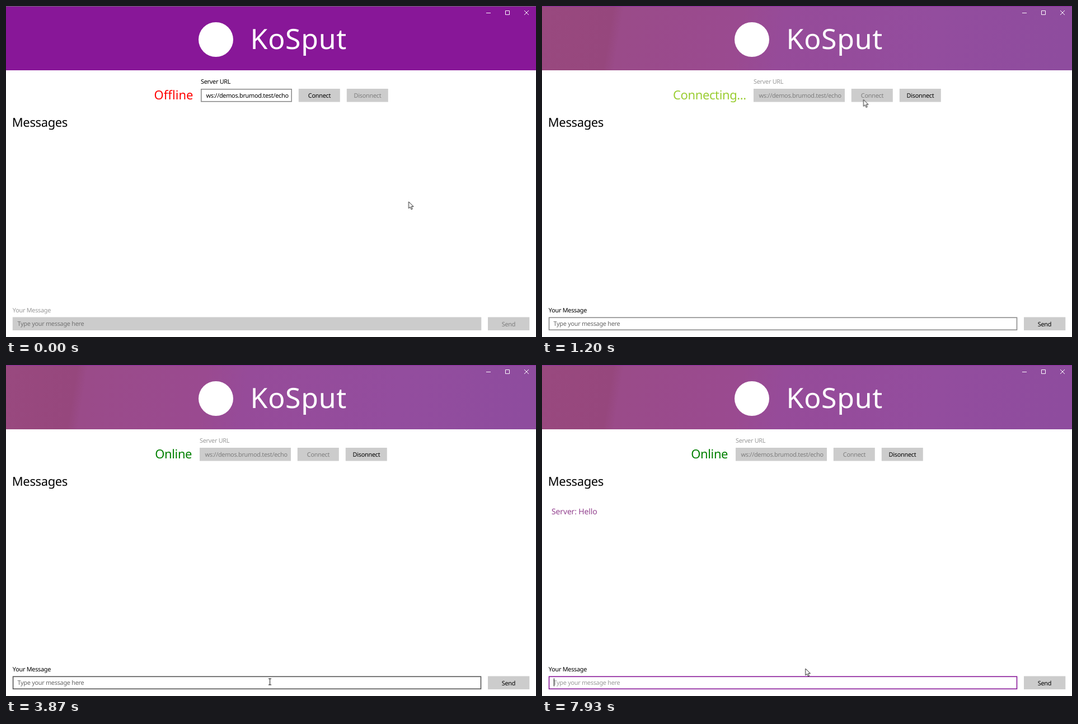
Recreate the animation shown at these times as an HTML page. Size 947 px wide and 592 px high, loop 8000 ms.

```html
<!DOCTYPE html>
<html lang="en">
<head>
<meta charset="utf-8">
<title>Chat client</title>
<style>
html, body { margin: 0; width: 100%; height: 100%; overflow: hidden; background: #fff; }
svg { display: block; width: 947px; height: 592px; }
svg * { animation: 8s step-end infinite; animation-name: none; }

text { font: 10.9px "Noto Sans", "Open Sans", sans-serif; letter-spacing: -.28px; text-rendering: geometricPrecision; }
.mid { text-anchor: middle; }
.head { font-size: 22px; letter-spacing: -.38px; }
.title { font-size: 50px; letter-spacing: .7px; fill: #fff; }
.line { fill: none; stroke: #fff; }
.button { fill: #ccc; }
.field { stroke-width: 1.6px; }
.label { --off: #999; }

/* controls that switch on or off when the connection starts */
.enable { animation-name: enable; }
.disable { animation-name: disable; }
@keyframes enable { 0% { fill: var(--off, #7d7d7d); } 15% { fill: #000; } }
@keyframes disable { 0% { fill: #000; } 15% { fill: var(--off, #7d7d7d); } }

#acrylic { animation-name: acrylic; animation-timing-function: linear; }
@keyframes acrylic { 0%, 12.5% { opacity: 0; } 15%, 100% { opacity: 1; } }

#group { animation-name: shift; }
@keyframes shift {
  0% { transform: translateX(348px); }
  15% { transform: translateX(378px); }
  48.375% { transform: translateX(346px); }
}

#offline { fill: #f00; letter-spacing: .05px; animation-name: offline; }
#connecting { fill: #9acd32; animation-name: connecting; }
#online { fill: #008000; animation-name: online; }
@keyframes offline { 0% { opacity: 1; } 15% { opacity: 0; } }
@keyframes connecting { 0% { opacity: 0; } 15% { opacity: 1; } 48.375% { opacity: 0; } }
@keyframes online { 0% { opacity: 0; } 48.375% { opacity: 1; } }

#url { animation-name: url; }
@keyframes url { 0% { fill: #fff; stroke: #8e8e8e; } 15% { fill: #ccc; stroke: #ccc; } }

#connect { transform-box: fill-box; transform-origin: center; animation-name: press; }
@keyframes press {
  0% { fill: #ccc; stroke: none; }
  6.75% { fill: #ccc; stroke: #8a8a8a; }
  12.5% { fill: #999; stroke: none; transform: scale(.98); }
  15% { fill: #ccc; stroke: none; transform: none; }
}

#entry { animation-name: entry; }
@keyframes entry {
  0% { fill: #ccc; stroke: #ccc; }
  15% { fill: #fff; stroke: #8a8a8a; }
  25.625% { fill: #fff; stroke: #555; }
  54.125% { fill: #fff; stroke: #881798; }
}
#hint { animation-name: hint; }
@keyframes hint {
  0% { fill: #737373; }
  15% { fill: #666; }
  54.125% { fill: #999; }
  69.125% { fill: transparent; }
  95.875% { fill: #999; }
}
#clear { stroke: #555; animation-name: clear; }
@keyframes clear { 0% { opacity: 0; } 69.125% { opacity: 1; } 95.875% { opacity: 0; } }
#caret { animation-name: caret; }
@keyframes caret { 0% { opacity: 0; } 54.125% { opacity: 1; } }

#reply { font-size: 14px; letter-spacing: -.15px; fill: #93428f; animation-name: reply; }
@keyframes reply { 0% { opacity: 0; } 99.125% { opacity: 1; } }

#pointer { animation-name: travel; }
@keyframes travel {
  0% { transform: translate(719.5px, 350px); }
  .5% { transform: translate(719.5px, 350px); animation-timing-function: ease-in-out; }
  7.5% { transform: translate(574.5px, 167.5px); }
  15.4% { transform: translate(574.5px, 167.5px); animation-timing-function: cubic-bezier(.4, 0, .7, .8); }
  22.5% { transform: translate(500px, 530px); animation-timing-function: ease-out; }
  29.125% { transform: translate(475px, 562px); }
  31.625% { transform: translate(471.5px, 566.5px); }
  57.5% { transform: translate(470.8px, 543px); }
}
#arrow { fill: #fff; stroke: #222; animation-name: arrow; }
#beam { stroke: #000; animation-name: beam; }
@keyframes arrow { 0% { opacity: 1; } 25.625% { opacity: 0; } 57.5% { opacity: 1; } }
@keyframes beam { 0% { opacity: 0; } 25.625% { opacity: 1; } 57.5% { opacity: 0; } }
</style>
</head>
<body>
<svg viewBox="0 0 947 592">
  <defs>
    <linearGradient id="tint" x2="1" y2=".02">
      <stop offset="0" stop-color="#99497f"/>
      <stop offset=".135" stop-color="#96477d"/>
      <stop offset=".155" stop-color="#9a4b89"/>
      <stop offset=".38" stop-color="#9a4a90"/>
      <stop offset=".46" stop-color="#964b99"/>
      <stop offset=".75" stop-color="#934d9e"/>
      <stop offset="1" stop-color="#8e4c9e"/>
    </linearGradient>
  </defs>

  <rect width="947" height="115" fill="#881798"/>
  <rect width="947" height="1" fill="#776a7a"/>
  <g id="acrylic">
    <rect width="947" height="115" fill="url(#tint)"/>
    <rect width="947" height="1" fill="#8f2ba6"/>
  </g>
  <circle cx="375" cy="60" r="31" fill="#fff"/>
  <text class="title" x="436.5" y="77">KoSput</text>
  <path class="line" d="M858 12.5h8M892.5 8.5h7v7h-7zM926 8l8 8M934 8l-8 8"/>

  <text class="head" id="offline" x="264.5" y="167">Offline</text>
  <text class="head" id="connecting" x="234" y="167">Connecting...</text>
  <text class="head" id="online" x="266.3" y="167">Online</text>

  <g id="group">
    <text class="label disable" x="0" y="139">Server URL</text>
    <rect class="field" id="url" x=".8" y="148.8" width="161.4" height="22"/>
    <text class="disable" x="9.5" y="164">ws://demos.brumod.test/echo</text>
    <rect class="button" id="connect" x="174.8" y="148" width="74" height="23.6"/>
    <text class="mid disable" x="212" y="164.4">Connect</text>
    <rect class="button" x="260.8" y="148" width="74" height="23.6"/>
    <text class="mid enable" x="298" y="164.4">Disonnect</text>
  </g>

  <text class="head" x="10.8" y="216">Messages</text>
  <text id="reply" x="17" y="267">Server: Hello</text>

  <text class="label enable" x="11.8" y="548">Your Message</text>
  <rect class="field" id="entry" x="12.6" y="557.3" width="835.9" height="22"/>
  <text id="hint" x="20.5" y="572">Type your message here</text>
  <text id="typed" x="20.5" y="572"></text>
  <rect id="caret" x="21" y="560.5" width="1" height="14"/>
  <path id="clear" d="M834.8 565l6.8 6.8M841.6 565l-6.8 6.8"/>
  <rect class="button" x="861" y="556.5" width="74.3" height="23.6"/>
  <text class="mid enable" x="898" y="572.6">Send</text>

  <g id="pointer">
    <path id="arrow" d="M0 0V12L2.8 9.4 4.7 13.8 6.7 13 4.8 8.7H8.6Z"/>
    <path id="beam" fill="none" d="M-2.5-5.5h5M0-5.5v11M-2.5 5.5h5"/>
  </g>
</svg>
<script>
const $ = id => document.getElementById(id);
const typed = $('typed'), caret = $('caret');
const keys = [[0, ''], [5530, 'H'], [6270, 'He'], [6530, 'Hel'], [6800, 'Hell'], [7000, 'Hello'], [7670, '']];
const clock = $('pointer').getAnimations()[0];

// Typing follows the same clock as the CSS animations.
function tick() {
  const t = (clock.currentTime || 0) % 8000;
  const text = keys.filter(([at]) => at <= t).pop()[1];
  if (typed.textContent !== text) {
    typed.textContent = text;
    caret.setAttribute('x', 21 + (text ? typed.getComputedTextLength() : 0));
  }
  requestAnimationFrame(tick);
}
tick();
</script>
</body>
</html>
```
